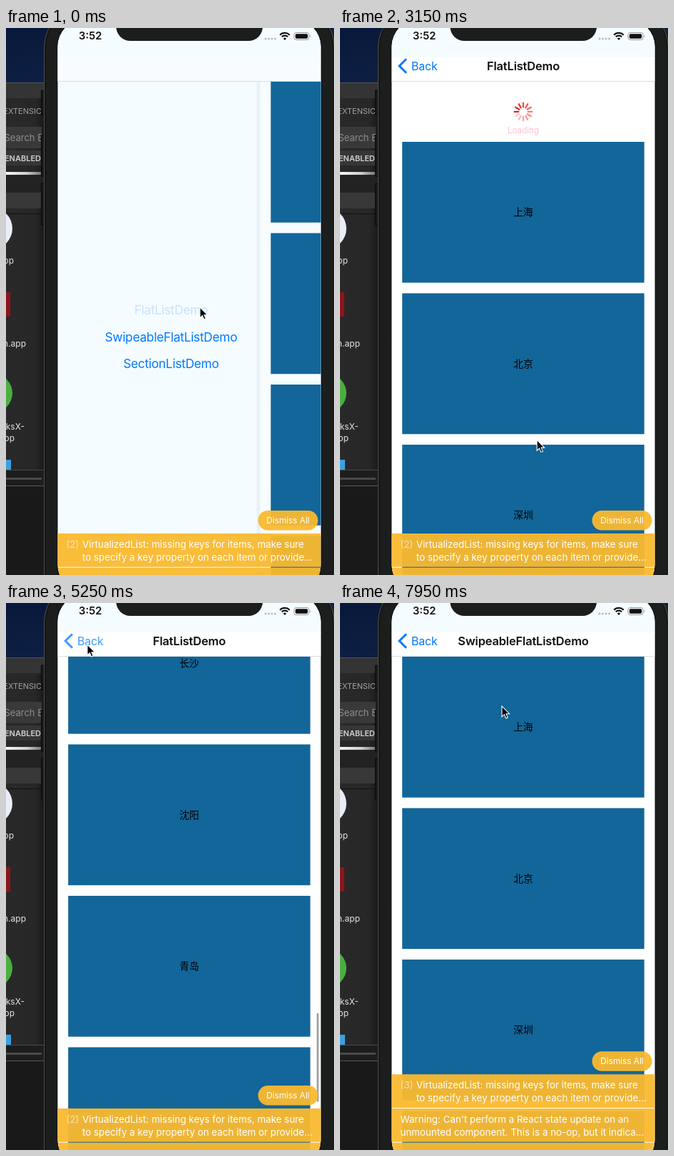
Write an HTML page that moves like this. It is 460x764 px and loops after 8000 ms.

```html
<!DOCTYPE html>
<html lang="zh-CN">
<head>
<meta charset="utf-8">
<title>List demo</title>
<style>
html, body { margin: 0; width: 100%; height: 100%; overflow: hidden; background: #1b1b1b; }
svg { display: block; width: 100%; height: 100%; font-family: Inter, "Open Sans", sans-serif; }
.mid { text-anchor: middle; }
.end { text-anchor: end; }
.link { font-size: 17.3px; letter-spacing: -.016em; fill: #007aff; text-anchor: middle; }
.city { font: 13.8px "Noto Sans CJK SC", "Noto Sans CJK", sans-serif; text-anchor: middle; }
.title { font-size: 16.5px; font-weight: 600; letter-spacing: -.012em; fill: #111; text-anchor: middle; }
.toast { font-size: 13.4px; fill: #fff; }
.file { font-size: 12px; fill: #e4e4e4; text-anchor: end; }
</style>
</head>
<body>
<svg id="stage" viewBox="0 0 460 764" preserveAspectRatio="none">
  <defs>
    <linearGradient id="sky" x2="1" y2="1">
      <stop stop-color="#08183a"/><stop offset=".7" stop-color="#0e2246"/><stop offset="1" stop-color="#0b1a34"/>
    </linearGradient>
    <linearGradient id="side">
      <stop stop-color="#292929"/><stop offset=".75" stop-color="#272727"/><stop offset="1" stop-color="#171717"/>
    </linearGradient>
    <linearGradient id="shine">
      <stop stop-color="#f4f4f4"/><stop offset=".6" stop-color="#d0d0d0"/><stop offset="1" stop-color="#777"/>
    </linearGradient>
    <clipPath id="screen"><rect x="72.5" y="-12" width="369" height="800" rx="38"/></clipPath>
  </defs>

  <g id="desktop">
    <rect width="460" height="77" fill="url(#sky)"/>
    <rect y="76" width="55" height="565" fill="url(#side)"/>
    <rect y="76" width="55" height="1" fill="#555"/>
    <rect y="77" width="55" height="21" fill="#343434"/>
    <text class="end" x="50" y="120" font-size="11" fill="#a0a0a0">EXTENSIC</text>
    <rect y="138" width="50" height="30" fill="#393939"/>
    <text class="end" x="52" y="158" font-size="13" fill="#8d8d8d">Search E</text>
    <rect y="171" width="55" height="21" fill="#363636"/>
    <text class="end" x="49" y="186" font-size="11" font-weight="600" fill="#d0d0d0">ENABLED</text>
    <rect y="201" width="49" height="4" fill="url(#shine)"/>
    <rect y="206" width="55" height="24" fill="#222"/>
    <rect y="230" width="55" height="22" fill="#383838"/>
    <rect y="259" width="55" height="1" fill="#111"/>
    <circle cx="-20" cy="280" r="29" fill="#e9edf8"/>
    <rect x="-28" y="369" width="34" height="34" fill="#8c141c"/>
    <circle cx="-18" cy="510" r="27" fill="#4cae41"/>
    <rect x="-28" y="603" width="35" height="14" fill="#3c9fe0"/>
    <text class="file" x="11" y="329">.app</text>
    <text class="file" x="28" y="445">n.app</text>
    <text class="file" x="26" y="561">ksX-</text>
    <text class="file" x="12" y="577">.app</text>
    <rect y="617" width="55" height="23" fill="#1d1d1d"/>
    <rect y="617" width="55" height="1" fill="#484848"/>
    <rect y="628" width="50" height="3" fill="#4a4a4a"/>
    <rect y="639" width="55" height="1" fill="#585858"/>
    <rect y="640" width="55" height="124" fill="#191919"/>
  </g>

  <g id="body">
    <path d="M49.5 87h5v34h-5zM49.5 149h5v58h-5zM49.5 217h5v58h-5z" fill="#181818" stroke="#090909"/>
    <rect x="53.5" y="-31" width="407" height="850" rx="58" fill="#1c1e1e" stroke="#4b4b4b"/>
    <rect x="55.5" y="-29" width="403" height="846" rx="56" fill="none" stroke="#111"/>
    <rect x="71.5" y="-13" width="371" height="802" rx="39" fill="#0b0b0b"/>
  </g>

  <g clip-path="url(#screen)">
    <rect x="72" y="-12" width="370" height="800" fill="#f5fcff"/>
    <g id="home"></g>
    <g id="page">
      <rect x="67.5" y="75" width="5" height="700" opacity=".045"/>
      <rect id="paper" x="72.5" y="75" width="369" height="700"/>
      <g id="rows"></g>
      <g id="loader">
        <g id="spokes" stroke="#f01414" stroke-width="2.2" stroke-linecap="round"></g>
        <text class="mid" y="30" font-size="11.6" fill="#ffc0cb">Loading</text>
      </g>
      <rect id="bar" x="435.8" width="2.7" rx="1.35" opacity=".38"/>
    </g>
    <rect x="72" y="-12" width="370" height="54" fill="#f5fcff"/>
    <rect id="nav" x="72" y="41" width="370" height="34"/>
    <rect x="72" y="74" width="370" height="1" fill="#d9dddf"/>
    <g id="back">
      <path d="M92 44.3L83.2 53l8.8 8.7" fill="none" stroke="#007aff" stroke-width="3" stroke-linecap="square"/>
      <text x="100" y="59" font-size="16.1" letter-spacing="-.25" fill="#007aff">Back</text>
    </g>
    <text id="title" class="title" y="59"></text>
    <text x="102" y="16" font-size="14.8" font-weight="600" fill="#111">3:52</text>
    <g fill="#b9bec1">
      <circle cx="364" cy="15" r="1.6"/><circle cx="368.5" cy="15" r="1.6"/>
      <circle cx="373" cy="15" r="1.6"/><circle cx="377.5" cy="15" r="1.6"/>
    </g>
    <g fill="none" stroke="#111" stroke-width="2.2">
      <path d="M384.2 9.7a9.7 9.7 0 0 1 13.6 0M386.8 12.3a6 6 0 0 1 8.4 0"/>
      <path d="M391 17l-2.2-2.3a3 3 0 0 1 4.4 0z" fill="#111" stroke="none"/>
    </g>
    <rect x="404" y="6.5" width="21" height="10" rx="3" fill="none" stroke="#999"/>
    <rect x="405.8" y="8.2" width="17.4" height="6.6" rx="1.7" fill="#111"/>
    <path d="M426.5 9.7q2 1.8 0 3.6z" fill="#999"/>
    <path d="M154.5 -12V-2A20 20 0 0 0 174.5 18H340A20 20 0 0 0 360 -2V-12Z" fill="#1c1e1e"/>
    <g id="toasts"></g>
  </g>

  <path id="cursor" d="M0 0V14.8L3.4 11.6L5.7 17L8.2 16L6 10.7H10.5Z" fill="#000" stroke="#fff" stroke-width="1.1"/>
</svg>
<script>
const LOOP = 8000, TICK = 150, PITCH = 211.5, WIDTH = 369, MID = 257;
const TOAST_PITCH = 47.7, TOAST_END = 753.7;
const $ = id => document.getElementById(id);
const set = (el, attrs) => { for (const k in attrs) el.setAttribute(k, attrs[k]); };
const clamp = v => Math.max(0, Math.min(1, v));

const cities = "上海 北京 深圳 广州 成都 杭州 重庆 武汉 苏州 天津 南京 西安 郑州 长沙 沈阳 青岛 宁波 东莞 无锡".split(" ");
const demos = ["FlatListDemo", "SwipeableFlatListDemo", "SectionListDemo"];
const keysNote = ["VirtualizedList: missing keys for items, make sure", "to specify a key property on each item or provide..."];
const stateNote = ["Warning: Can't perform a React state update on an", "unmounted component. This is a no-op, but it indica..."];

// Each key: time, then values
const scrollKeys = [
  [0, 0], [600, 0], [900, 190], [1200, 513.5], [1500, 300], [1800, 60], [2100, -105],
  [2250, -129], [2550, -84], [3150, -84], [3300, 20], [3600, 700], [4050, 2151],
  [4350, 2560], [4800, 2838.5], [6000, 2838.5], [6001, 0]
];
const cursorKeys = [
  [0, 272, 390], [300, 274, 400], [600, 284, 480], [1200, 307, 272], [1350, 303, 262],
  [2250, 273, 637], [2550, 273, 637], [3300, 277, 560], [3600, 306, 160], [3750, 284, 460],
  [4050, 313, 114], [4350, 292, 400], [4650, 308, 190], [5100, 126, 68], [5250, 114, 58],
  [5400, 114, 58], [6150, 278, 426], [6900, 278, 426], [7500, 351, 296], [7950, 227, 144]
];

function sample(keys, t) {
  const i = keys.findIndex(k => k[0] > t);
  if (i < 0) return keys[keys.length - 1].slice(1);
  const a = keys[i - 1], b = keys[i], u = (t - a[0]) / (b[0] - a[0]);
  return a.slice(1).map((v, n) => v + (b[n + 1] - v) * u);
}

// 0: home shown, 1: list page shown
function pageShare(t) {
  const rest = (start, span) => (1 - clamp((t - start) / span)) ** 3;
  if (t < 5300) return 1 - 0.77 * rest(0, 500);
  if (t < 6600) return rest(5300, 550);
  return 1 - rest(6650, 600);
}

$("home").innerHTML = demos.map((d, i) =>
  `<text class="link" x="${MID}" y="${400.3 + i * 37.2}">${d}</text>`).join("");
$("rows").innerHTML = cities.map((c, i) =>
  `<g transform="translate(0 ${i * PITCH})"><rect x="87.2" width="339.5" height="196.7" fill="#126699"/>
   <text class="city" x="${MID}" y="103.3">${c}</text></g>`).join("");
$("spokes").innerHTML = Array.from({ length: 12 }, (_, i) =>
  `<path d="M0 -6.5V-12.5" transform="rotate(${i * 30})"/>`).join("");

const toastBack = (y, height) => `<rect x="72" y="${y}" width="370" height="${height}"/>`;

function toastText(y, lines, count) {
  const x = count ? 107 : 84.5;
  const badge = count ? `<text class="toast" x="84.5" y="${y + 19.5}" opacity=".6">(${count})</text>` : "";
  return badge + lines.map((s, i) =>
    `<text class="toast" x="${x}" y="${y + 19.5 + i * 18}">${s}</text>`).join("");
}

// The one-pixel gaps between rows let the page show through
function toastStack(rows) {
  const top = TOAST_END - rows.length * TOAST_PITCH;
  const rowY = i => top + i * TOAST_PITCH;
  return `<g fill="#faba30" fill-opacity=".95">
    ${rows.map((_, i) => toastBack(rowY(i), TOAST_PITCH - 1)).join("")}
    ${toastBack(TOAST_END, 40)}
    <rect x="353.5" y="${top - 32}" width="84" height="27.5" rx="13.75"/></g>
    <text class="mid" x="395.5" y="${top - 14}" font-size="11.8" fill="#fff">Dismiss All</text>` +
    rows.map(([lines, count], i) => toastText(rowY(i), lines, count)).join("");
}

const stacks = [
  [[keysNote, 2]],
  [[stateNote], [keysNote, 2]],
  [[keysNote, 3], [stateNote]]
].map(toastStack);
let shownStack = -1;

function showToasts(t) {
  const n = t < 5850 ? 0 : t < 7200 ? 1 : 2;
  if (n !== shownStack) $("toasts").innerHTML = stacks[shownStack = n];
}

function showLoader(t, scroll) {
  const gap = Math.max(0, -scroll);
  set($("loader"), { transform: `translate(${MID} ${75 + gap / 2})`, opacity: gap > 40 ? 1 : 0 });
  const turn = Math.round((t - 2250) / 100);
  [...$("spokes").children].forEach((spoke, i) => {
    const age = (i - turn + 120) % 12;
    const pulled = i < gap / 12.5 ? 1 : 0;
    set(spoke, { opacity: t > 2250 ? 1 - age * 0.07 : pulled });
  });
}

function draw(t) {
  const p = pageShare(t), [scroll] = sample(scrollKeys, t), [cx, cy] = sample(cursorKeys, t);
  const warm = clamp(t / 450);
  const paper = `rgb(${247 + 8 * warm},${252 + 3 * warm},255)`;

  set($("home"), { transform: `translate(${-0.3 * WIDTH * p} 0)` });
  const pressed = t < 300 ? 0 : t >= 6600 && t < 6900 ? 1 : -1;
  [...$("home").children].forEach((el, i) => set(el, { opacity: i === pressed ? 0.2 : 1 }));

  set($("page"), { transform: `translate(${WIDTH * (1 - p)} 0)`, display: p > 0 ? "inline" : "none" });
  set($("paper"), { fill: paper });
  set($("nav"), { fill: paper });
  set($("rows"), { transform: `translate(0 ${75 - scroll})` });
  showLoader(t, scroll);

  const moving = t > 600 && t < 2600 || t > 3200 && t < 5700;
  set($("bar"), {
    y: 78 + Math.max(0, scroll) * 0.1743,
    height: Math.max(7, 124 + Math.min(0, scroll)),
    visibility: moving ? "visible" : "hidden"
  });

  const shown = clamp((p - 0.3) / 0.7);
  $("title").textContent = demos[t < 6450 ? 0 : 1];
  set($("title"), { x: MID + 110 * (1 - p), opacity: shown });
  set($("back"), { opacity: t >= 5250 && t < 6000 ? shown * 0.75 : shown });

  showToasts(t);
  set($("cursor"), { transform: `translate(${cx} ${cy})` });
}

const start = performance.now();
function frame() {
  const t = (performance.now() - start) % LOOP;
  draw(Math.floor(t / TICK) * TICK);
  requestAnimationFrame(frame);
}
frame();
</script>
</body>
</html>
```
